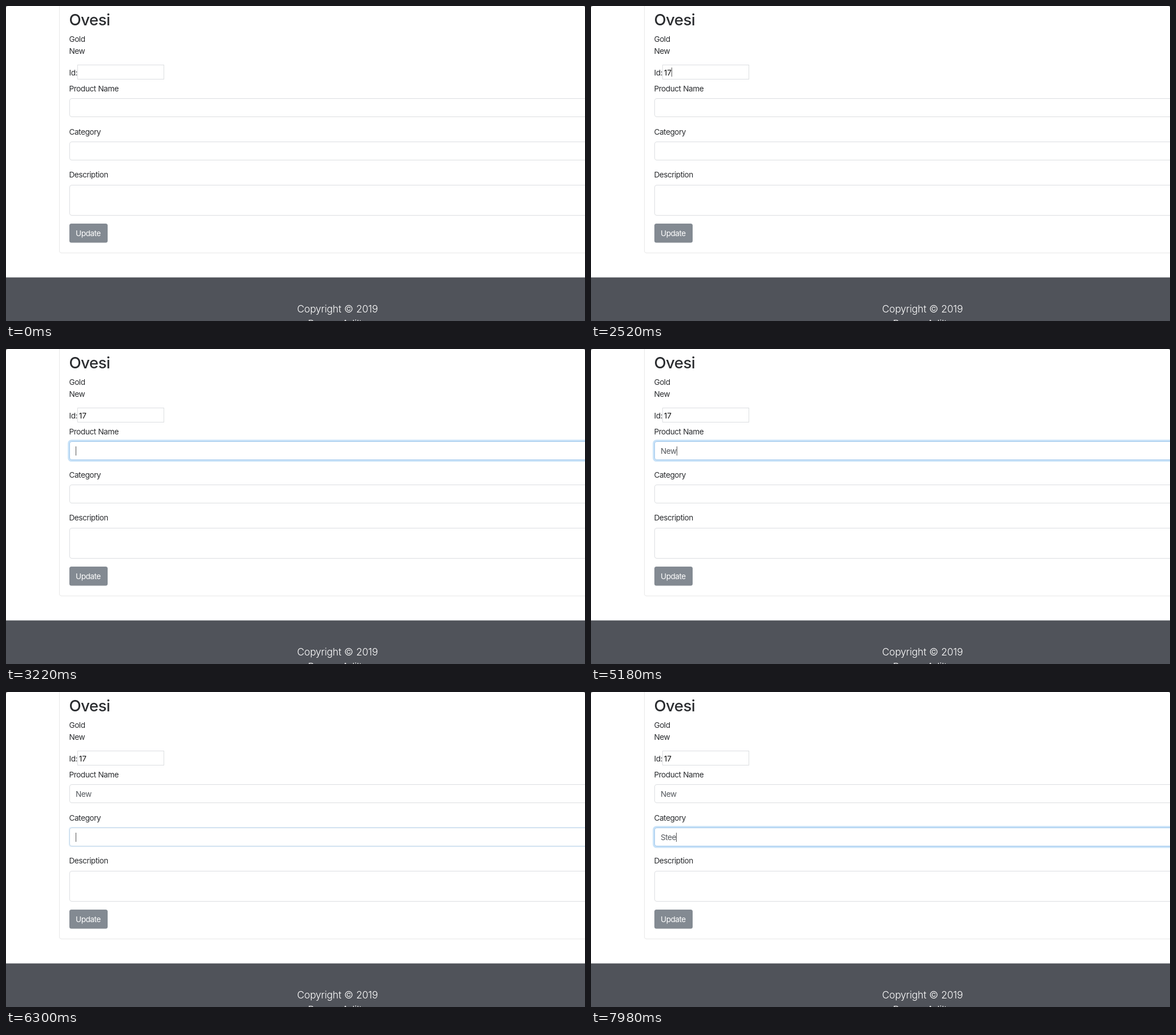
Recreate the animation shown at these times as an HTML page. Size 1014 px wide and 553 px high, loop 8000 ms.

```html
<!DOCTYPE html>
<html lang="en">
<head>
<meta charset="utf-8">
<title>Product form</title>
<style>
  html, body { margin: 0; width: 100%; height: 100%; overflow: hidden; background: #888; }
  svg { display: block; width: 1014px; height: 553px; background: #fff; border-radius: 4px 4px 0 0; }
  text { font: 13.6px Inter, "Open Sans", sans-serif; letter-spacing: -.48px; word-spacing: .5px; fill: #2b2d30; white-space: pre; }
  .title { font-size: 27.6px; font-weight: 500; letter-spacing: -.6px; }
  .value { fill: #55595e; }
  .id { fill: #111; letter-spacing: -.1px; }
  .button { fill: #fff; }
  .foot { font-size: 17.4px; font-weight: 300; letter-spacing: -.2px; fill: #fff; text-anchor: middle; }
  .box { fill: #fff; stroke: #dcdee1; }
</style>
</head>
<body>
<svg viewBox="0 0 1014 553">
  <rect x="93.5" y="-20" width="974" height="453.5" rx="3.5" fill="#fff" stroke="#e8e8e8"/>
  <text class="title" x="110.5" y="34">Ovesi</text>
  <text x="110.5" y="62.5">Gold</text>
  <text x="110.5" y="83.5">New</text>
  <text x="110.5" y="121.5">Id:</text>
  <text x="110.5" y="150">Product Name</text>
  <text x="110.5" y="225.5">Category</text>
  <text x="110.5" y="301">Description</text>
  <g id="fields"></g>
  <rect x="111" y="382" width="67" height="33.5" rx="3.5" fill="#838a92"/>
  <text class="button" x="122" y="404">Update</text>
  <rect y="476.5" width="1014" height="77" fill="#50535a"/>
  <text class="foot" x="580.5" y="538">Copyright © 2019</text>
  <text class="foot" x="576" y="564">Resura Adilt</text>
  <rect id="caret" width="1" height="16" fill="#555"/>
</svg>
<script>
const LOOP = 8000, BLINK = 525;
const caret = document.getElementById('caret');

function add(tag, attrs) {
  const el = document.createElementNS('http://www.w3.org/2000/svg', tag);
  for (const k in attrs) el.setAttribute(k, attrs[k]);
  return document.getElementById('fields').appendChild(el);
}

function field(x, y, w, h, rx, pad, cls) {
  const ring = add('rect', { fill: '#4a9fe8', opacity: 0 });
  const box = add('rect', { class: 'box', x: x + .5, y: y + .5, width: w - 1, height: h - 1, rx });
  const text = add('text', { class: cls, x: x + pad, y: y + h / 2 + 5.5 });
  return { x, y, w, h, pad, ring, box, text };
}

const id = field(125, 103, 152, 26, 0, 2.8, 'id');
const product = field(111, 162, 940, 33, 3.5, 11, 'value');
const category = field(111, 238, 940, 33, 3.5, 11, 'value');
field(111, 314, 940, 54, 3.5, 11, 'value');

// Every key press: time, focused field, its content
const keys = [
  [2170, id, '1'], [2270, id, '17'],
  [3040, product, ''], [4830, product, 'N'], [4970, product, 'Ne'], [5110, product, 'New'],
  [6230, category, ''], [7420, category, 'S'], [7560, category, 'St'],
  [7770, category, 'Ste'], [7910, category, 'Stee']
];

const ramp = (t, start, length) => {
  const p = Math.min(1, Math.max(0, (t - start) / length));
  return p * p * (3 - 2 * p);
};

function glow(f, k) {
  const s = 2.8 * k;
  const attrs = { x: f.x - s, y: f.y - s, width: f.w + 2 * s, height: f.h + 2 * s, rx: 3.5 + s, opacity: .3 * k };
  for (const a in attrs) f.ring.setAttribute(a, attrs[a]);
  const mix = (a, b) => Math.round(a + (b - a) * k);
  f.box.style.stroke = `rgb(${mix(220, 160)},${mix(222, 200)},${mix(225, 236)})`;
}

function draw(t) {
  const content = new Map([[id, ''], [product, ''], [category, '']]);
  let last = null;
  for (const key of keys) {
    if (key[0] > t) break;
    last = key;
    content.set(key[1], key[2]);
  }
  content.forEach((s, f) => { f.text.textContent = s; });

  glow(product, ramp(t, 3085, 130) * (1 - ramp(t, 6210, 85)));
  glow(category, ramp(t, 6230, 150));

  const on = last && Math.floor((t - last[0]) / BLINK) % 2 === 0;
  caret.style.display = on ? '' : 'none';
  if (on) {
    const [, f, s] = last;
    const end = f.x + f.pad + (s ? f.text.getComputedTextLength() : 0);
    caret.setAttribute('x', Math.round(end));
    caret.setAttribute('y', Math.round(f.y + f.h / 2 - 8));
  }
}

const begin = performance.now();
function tick() {
  draw((performance.now() - begin) % LOOP);
  requestAnimationFrame(tick);
}
tick();
</script>
</body>
</html>
```
